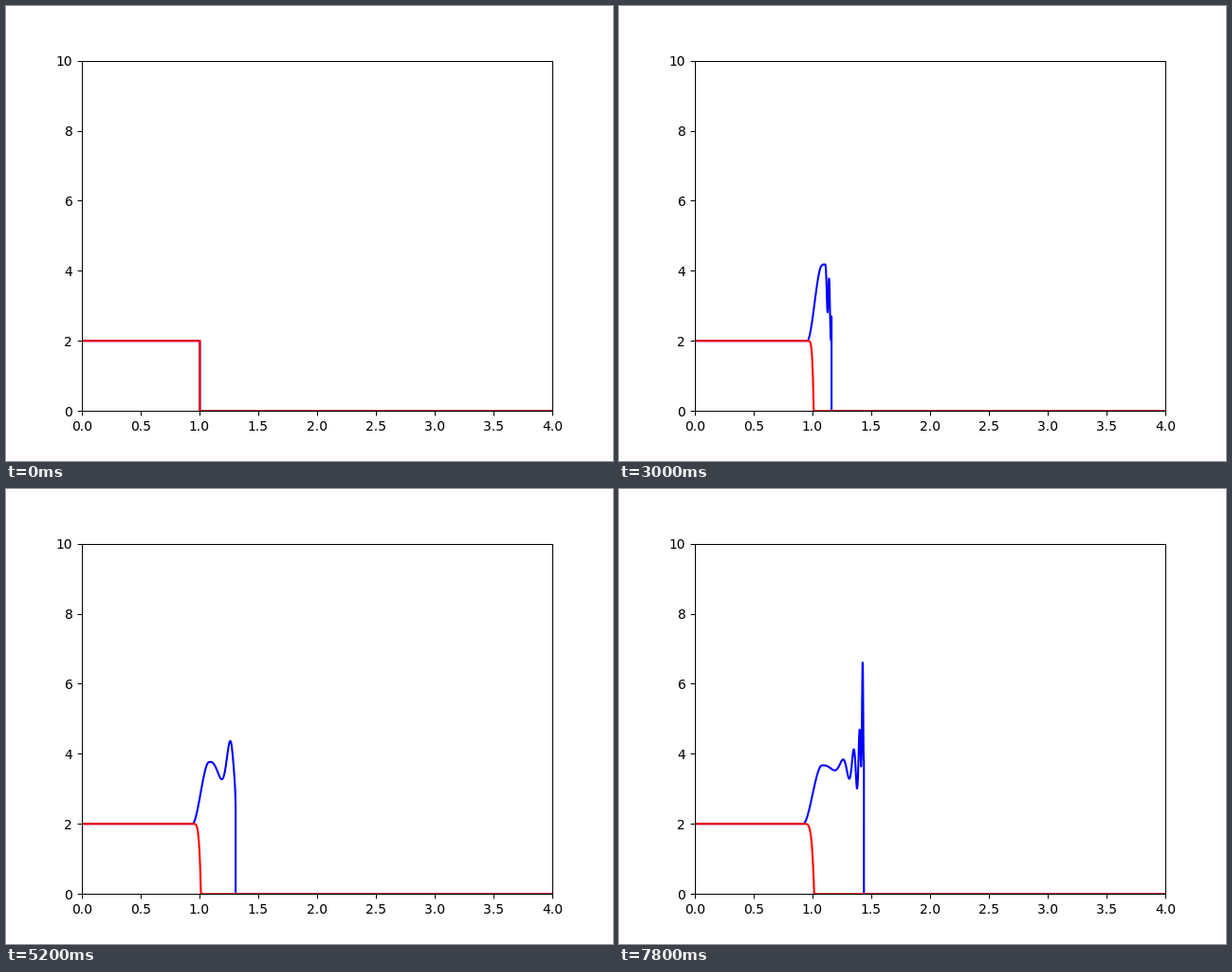
Recreate the animation shown at these times as an HTML page with a canvas. Size 640 px wide and 480 px high, loop 8000 ms.

```html
<!DOCTYPE html>
<html lang="en">
<head>
<meta charset="utf-8">
<title>Wave front plot</title>
<style>
  html, body { margin: 0; width: 100%; height: 100%; overflow: hidden; background: #fff; }
  canvas { display: block; }
</style>
</head>
<body>
<canvas id="stage" width="640" height="480"></canvas>
<script>
const ctx = document.getElementById('stage').getContext('2d');
const LOOP = 8000, STEP = 200;
const LEFT = 80, RIGHT = 576, TOP = 57.6, BASE = 427.2, PLATEAU = 353.28;
const EDGE = 204.4;    // where both curves drop at first
const CREST = 214;     // first crest of the wake
const LEVEL = 293;     // height around which the wake settles
const TAU = 2 * Math.PI;

const lerp = (a, b, k) => a + (b - a) * k;
const clamp = (v, lo, hi) => Math.min(hi, Math.max(lo, v));
const grown = t => Math.min(1, t / 600);
const foot = t => lerp(EDGE, 201.1 - 0.0009 * t, grown(t));
const front = t => EDGE + 0.007 * t + 1.3 * Math.sin(TAU * t / 4100);

// Crest number at x: the gaps between crests shrink geometrically.
const crestNumber = x => Math.log((260.5 - x) / 46.5) / Math.log(0.53);

// Standing ripples that fade with their distance from the front.
function chirp(x, t) {
  const cx = Math.max(x, CREST);
  const d = Math.max(0, front(t) - cx);
  return 42 * Math.exp(-d / 13) * Math.cos(TAU * crestNumber(cx));
}

// Narrow spike that swells and sinks right behind the front.
function surge(d, t) {
  const height = 15 + 62 * Math.cos(Math.PI * (t - 1600) / 6300) ** 4;
  return height * Math.cos(TAU * (t - 1000) / 1360) * d * Math.exp(1 - d);
}

// Early wavelet that widens while it rides with the front.
function wavelet(d, t) {
  const z = d / Math.max(0.3, t / 1000 - 0.9);
  const height = t < 3800 ? 50 * Math.max(0, Math.sin(Math.PI * (t - 1300) / 2500)) : 0;
  return height * Math.cos(2.6 * (z - 1)) * Math.exp(-((z - 1.6) ** 2));
}

function blueY(x, t) {
  const d = front(t) - x, start = foot(t);
  const end = Math.max(start + 1, Math.min(CREST, front(t) - 1.5));
  const u = clamp((x - start) / (end - start), 0, 1);
  const rise = u * u * (3 - 2 * u) * grown(t);
  return lerp(PLATEAU, LEVEL - chirp(x, t) - surge(d, t) - wavelet(d, t), rise);
}

const redEnd = t => EDGE + 0.6 * grown(t) + 0.0001 * t;

function redY(x, t) {
  const u = (x - foot(t)) / (redEnd(t) - foot(t) || 1);
  return lerp(PLATEAU, BASE, u ** 5);
}

function curve(height, end, t, color) {
  ctx.strokeStyle = color;
  ctx.lineWidth = 2.083;
  ctx.lineJoin = 'round';
  ctx.beginPath();
  ctx.moveTo(LEFT, PLATEAU);
  for (let x = foot(t); x < end; x += 0.1) ctx.lineTo(x, height(x, t));
  ctx.lineTo(end, height(end, t));
  ctx.lineTo(end, BASE);
  ctx.lineTo(RIGHT, BASE);
  ctx.stroke();
}

function line(x1, y1, x2, y2) {
  ctx.beginPath();
  ctx.moveTo(x1, y1);
  ctx.lineTo(x2, y2);
  ctx.stroke();
}

// Each glyph's ink box sits on whole pixels, counted from the first glyph's ink.
const bearing = c => ({ 0: 0.92, 1: 1.53, 4: 0.68, 6: 0.98, 8: 0.94 })[c] ?? 1;

function label(text, x, y, align) {
  const first = bearing(text[0]);
  const origin = Math.round(x - align * ctx.measureText(text).width + first);
  let pen = 0;
  for (const c of text) {
    const ink = Math.floor(pen + bearing(c));
    ctx.fillText(c, origin + Math.trunc(ink - first) - ink + pen, y);
    pen += ctx.measureText(c).width;
  }
}

function axes() {
  ctx.strokeStyle = ctx.fillStyle = '#000';
  ctx.lineWidth = 1;
  ctx.lineJoin = 'miter';
  ctx.strokeRect(80.5, 58.5, 496, 369);
  ctx.font = '13.89px "DejaVu Sans", sans-serif';
  for (let i = 0; i <= 8; i++) {
    const x = LEFT + 62 * i;
    line(x + 0.5, 427.5, x + 0.5, 432.4);
    label((i / 2).toFixed(1), x, 448, 0.5);
  }
  for (let v = 0; v <= 10; v += 2) {
    const y = lerp(BASE, TOP, v / 10), row = Math.round(y) + 0.5;
    line(75.6, row, 80.5, row);
    label(String(v), 70.28, Math.round(y + 5.5), 1);
  }
}

function draw(t) {
  ctx.fillStyle = '#fff';
  ctx.fillRect(0, 0, 640, 480);
  ctx.save();
  ctx.beginPath();
  ctx.rect(LEFT, 58, RIGHT - LEFT, 370);
  ctx.clip();
  curve(blueY, front(t), t, '#00f');
  curve(redY, redEnd(t), t, '#f00');
  ctx.restore();
  axes();
}

const start = performance.now();
function tick() {
  const t = (performance.now() - start) % LOOP;
  draw(Math.floor(t / STEP) * STEP);
  requestAnimationFrame(tick);
}
tick();
</script>
</body>
</html>
```
